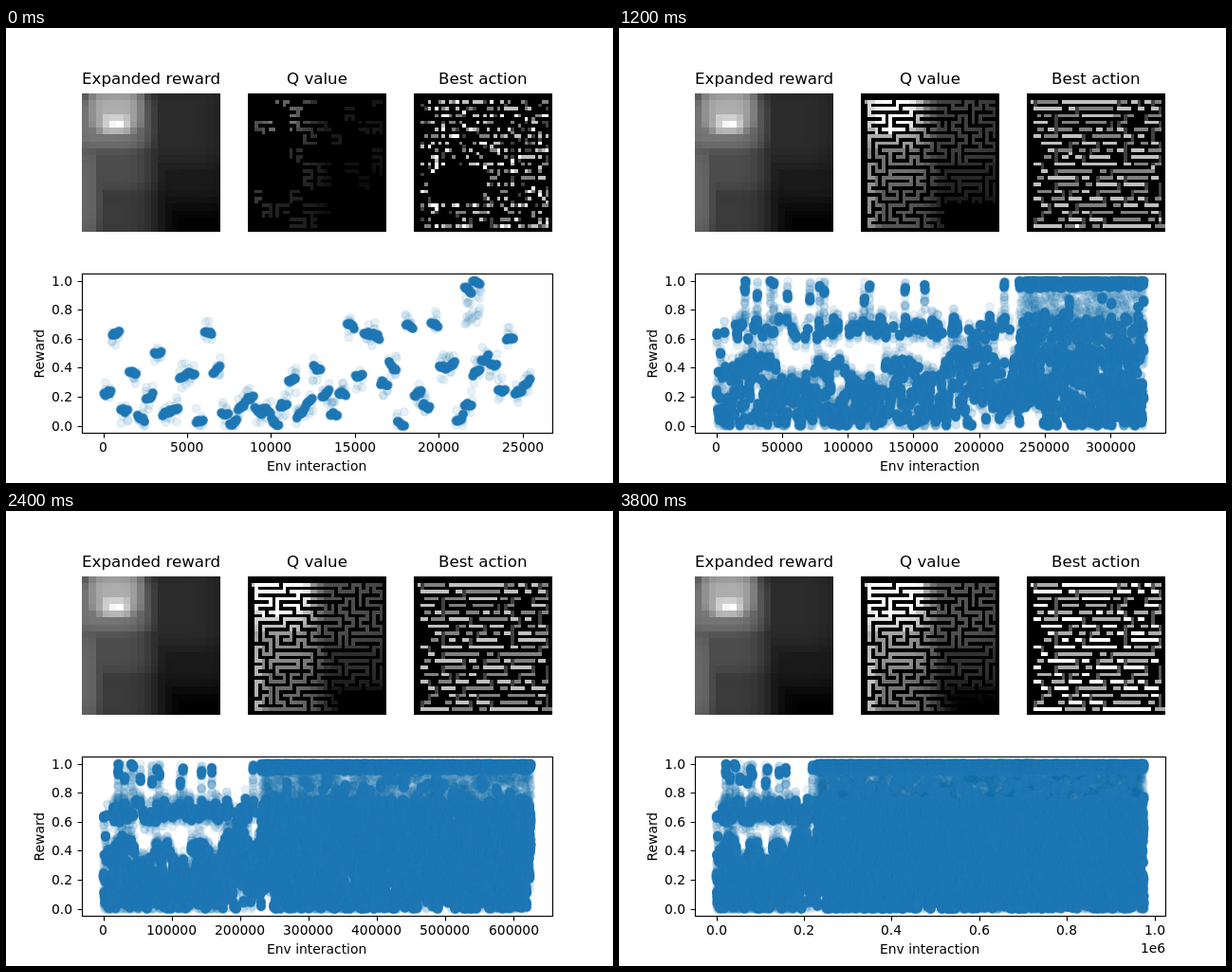
Animation, 640 px wide and 480 px high, one loop 3900 ms. Source, as an HTML page with a canvas:

```html
<!DOCTYPE html>
<html lang="en">
<head>
<meta charset="utf-8">
<title>Maze learning progress</title>
<style>
html, body { margin: 0; width: 100%; height: 100%; overflow: hidden; background: #fff; }
canvas { display: block; }
</style>
</head>
<body>
<canvas id="stage" width="640" height="480"></canvas>
<script>
const ctx = document.getElementById('stage').getContext('2d');
const STEPS = 39, STEP_MS = 100, CELLS = 40, CELL = 145.88 / CELLS, MAP_TOP = 68.66;
const RUN = 500, RUNS_PER_STEP = 50;
const BLUE = '#1f77b4';

function seeded(seed) {
  return () => {
    seed = (seed + 0x6d2b79f5) | 0;
    let t = Math.imul(seed ^ (seed >>> 15), seed | 1);
    t ^= t + Math.imul(t ^ (t >>> 7), t | 61);
    return ((t ^ (t >>> 14)) >>> 0) / 4294967296;
  };
}
const clamp = v => Math.max(0, Math.min(1, v));

// Reward field: soft boxes that fade away from the goal
const boxes = [
  { x: 10, y: 9, rx: 3.6, ry: 1.9, level: 1 },
  { x: 9, y: 8, rx: 6.5, ry: 4, level: .83 },
  { x: 9, y: 5, rx: 10, ry: 8, level: .68 },
  { x: 7, y: 8, rx: 15, ry: 11, level: .47 },
  { x: 0, y: 28, rx: 6, ry: 20, level: .4 },
  { x: 8, y: 20, rx: 15, ry: 12, level: .3 },
  { x: 8, y: 34, rx: 15, ry: 14, level: .23 },
  { x: 24, y: 8, rx: 22, ry: 17, level: .17 },
  { x: 30, y: 22, rx: 16, ry: 11, level: .1 }
];
function fieldAt(col, row) {
  const x = 2 * Math.floor(col / 2) + 0.5, y = 2 * Math.floor(row / 2) + 0.5;
  return Math.max(...boxes.map(b =>
    b.level * Math.exp(-(((x - b.x) / b.rx) ** 4) - ((y - b.y) / b.ry) ** 4)));
}

// Depth-first maze of 19 x 19 rooms with mostly horizontal corridors
const ROOMS = 19;
const MOVES = [[0, -1], [0, 1], [-1, 0], [1, 0]]; // up, down, left, right

function buildMaze() {
  const random = seeded(11), open = new Set(), seen = new Set();
  const key = (x, y) => y * CELLS + x;
  function carve(x, y) {
    seen.add(key(x, y));
    open.add(key(2 + 2 * x, 2 + 2 * y));
    MOVES.map(([dx, dy]) => ({ dx, dy, rank: random() - (dx ? 0.25 : 0) }))
      .sort((a, b) => a.rank - b.rank)
      .forEach(({ dx, dy }) => {
        const nx = x + dx, ny = y + dy;
        if (nx < 0 || ny < 0 || nx >= ROOMS || ny >= ROOMS || seen.has(key(nx, ny))) return;
        open.add(key(2 + 2 * x + dx, 2 + 2 * y + dy));
        carve(nx, ny);
      });
  }
  carve(4, 3);
  open.add(key(1, 2));
  open.add(key(39, 38));

  // Flood from the goal; each cell keeps the move that leads back
  const cells = [], queue = [{ x: 10, y: 8, action: 2 }], found = new Set([key(10, 8)]);
  while (queue.length) {
    const cell = queue.shift();
    cells.push({ ...cell, chance: random(), slip: random(), stray: Math.floor(random() * 5) });
    MOVES.forEach(([dx, dy], i) => {
      const x = cell.x + dx, y = cell.y + dy;
      if (!open.has(key(x, y)) || found.has(key(x, y))) return;
      found.add(key(x, y));
      queue.push({ x, y, action: i ^ 1 });
    });
  }
  return cells;
}
const maze = buildMaze();
const patches = Array.from({ length: 100 }, seeded(5));

function drawCell(left, col, row, value) {
  const x0 = Math.round(left + col * CELL), x1 = Math.round(left + (col + 1) * CELL);
  const y0 = Math.round(MAP_TOP + row * CELL), y1 = Math.round(MAP_TOP + (row + 1) * CELL);
  const grey = Math.round(255 * clamp(value));
  ctx.fillStyle = `rgb(${grey},${grey},${grey})`;
  ctx.fillRect(x0, y0, x1 - x0, y1 - y0);
}

function drawMaps(step) {
  for (let row = 0; row < CELLS; row++)
    for (let col = 0; col < CELLS; col++) drawCell(80, col, row, fieldAt(col, row));
  ctx.fillStyle = '#000';
  ctx.fillRect(255, 69, 146, 146);
  ctx.fillRect(430, 69, 146, 146);

  const gain = 2 * (1 - Math.exp(-(step + 4) / 12));
  const cutoff = 0.08 * (1 - step / 38), reach = 0.3 + step * 0.2;
  const slip = 0.65 * Math.exp(-step / 2.6), levels = step < 28 ? 4 : 3;
  for (const c of maze) {
    const value = fieldAt(c.x, c.y);
    const patch = patches[Math.floor(c.y / 4) * 10 + Math.floor(c.x / 4)];
    if (value > cutoff && patch < reach) drawCell(255.06, c.x, c.y, value * gain);

    const unseen = step === 0 && (c.chance < 0.3 || Math.hypot((c.x - 12) / 9, (c.y - 26) / 6) < 1);
    const action = c.slip < slip ? c.stray : c.action;
    if (!unseen) drawCell(430.12, c.x, c.y, action / levels);
  }
}

// Rewards: early runs wander below a waving ceiling with rare peaks; later ones fill the range
const LEARNED = 230;
const peaks = [21.7, 31, 41, 43.5, 54, 71, 78.5, 82, 112.5, 116.5, 143.5, 158.5, 219];

function ceilingAt(k) {
  if (k > LEARNED) return 0.56;
  return 0.41 + 0.1 * Math.cos((Math.max(k, 34) - 34) * Math.PI / 26) + 0.15 * clamp((k - 140) / 80);
}

function buildRuns() {
  const random = seeded(42);
  const between = (a, b) => a + (b - a) * random();
  return Array.from({ length: STEPS * RUNS_PER_STEP + 1 }, (_, i) => {
    const k = i * RUN / 1000, levels = [], faint = [];
    const haze = (n, a, b) => { while (n--) faint.push([random() * RUN, clamp(between(a, b))]); };
    const floor = Math.abs(k - 240) < 9 ? 0.12 : 0;
    const level = random() < 0.16 ? between(.6, .74) : between(floor, ceilingAt(k));
    levels.push(level);
    haze(7, level - 0.09, level + 0.09);
    if (k > LEARNED) {
      levels.push(between(floor, .74));
      if (random() < 0.6) levels.push(between(.97, 1));
      if (random() < 0.08) levels.push(between(.6, .9));
      haze(6, .4, 1);
    } else if (peaks.some(p => Math.abs(p - k) < 0.5)) {
      levels.push(between(.86, 1));
      haze(16, .7, 1);
    }
    const solid = levels.map(y => ({ y, drift: between(-.06, .06) }));
    const wiggle = Array.from({ length: 6 }, () => between(-.015, .015));
    return { start: i * RUN, solid, faint, wiggle };
  });
}
const runs = buildRuns();

function dot(alpha) {
  const sprite = document.createElement('canvas');
  sprite.width = sprite.height = 12;
  const c = sprite.getContext('2d');
  c.globalAlpha = alpha;
  c.fillStyle = c.strokeStyle = BLUE;
  c.lineWidth = 1.39;
  c.arc(6, 6, 4.17, 0, 7);
  c.fill();
  c.stroke();
  return sprite;
}
const solidDot = dot(1), faintDot = dot(0.1);

// Anchor is the share of the width that lies left of x
function drawText(text, x, y, size = 13.89, anchor = 0.5) {
  ctx.font = `${size}px "DejaVu Sans", sans-serif`;
  ctx.fillStyle = '#000';
  ctx.fillText(text, Math.round(x - anchor * ctx.measureText(text).width), y);
}

function tickStep(range) {
  const raw = range / 9, power = 10 ** Math.floor(Math.log10(raw));
  return power * [1, 2, 2.5, 5, 10].find(m => m * power >= raw);
}

function drawPlot(step) {
  const count = RUN * (RUNS_PER_STEP * (step + 1) + 1);
  const toX = v => 102.55 + 450.9 * v / count;
  const toY = v => 419.56 - 152.73 * v;
  const stamp = (sprite, x, y) => ctx.drawImage(sprite, toX(x) - 6, toY(y) - 6);

  const visible = runs.filter(run => run.start < count);
  for (const run of visible)
    for (const [dx, y] of run.faint) stamp(faintDot, run.start + dx, y);
  const repeats = step ? 4 : 6;
  for (const run of visible)
    for (const { y, drift } of run.solid)
      for (let j = 0; j < repeats; j++) {
        const t = (j + 0.5) / repeats;
        stamp(solidDot, run.start + RUN * t, clamp(y + drift * (t - 0.5) + run.wiggle[j]));
      }

  ctx.strokeStyle = '#000';
  ctx.lineWidth = 1.11;
  ctx.strokeRect(80.5, 259.5, 496, 168);
  ctx.beginPath();
  const limit = count * 1.05, gap = tickStep(count * 1.1), scientific = limit >= 1e6;
  for (let v = 0; v <= limit; v += gap) {
    const x = Math.round(toX(v)) + 0.5;
    ctx.moveTo(x, 427.5);
    ctx.lineTo(x, 432.4);
    drawText(scientific ? (v / 1e6).toFixed(1) : String(v), toX(v), 447);
  }
  for (let i = 0; i <= 5; i++) {
    const y = Math.round(toY(i / 5)) + 0.5;
    ctx.moveTo(80.5, y);
    ctx.lineTo(75.6, y);
    drawText((i / 5).toFixed(1), 70.3, toY(i / 5) + 5, 13.89, 1);
  }
  ctx.stroke();
  if (scientific) drawText('1e6', 576, 466, 13.89, 1);
  drawText('Env interaction', 328, 467);
  ctx.save();
  ctx.translate(40, 343.5);
  ctx.rotate(-Math.PI / 2);
  drawText('Reward', 0, 0);
  ctx.restore();
}

function draw(step) {
  ctx.fillStyle = '#fff';
  ctx.fillRect(0, 0, 640, 480);
  drawMaps(step);
  ['Expanded reward', 'Q value', 'Best action'].forEach((title, i) =>
    drawText(title, 152.94 + 175.06 * i, 59, 16.67));
  drawPlot(step);
}

let shown = -1;
function tick() {
  const step = Math.floor(performance.now() / STEP_MS) % STEPS;
  if (step !== shown) draw(shown = step);
  requestAnimationFrame(tick);
}
tick();
</script>
</body>
</html>
```
